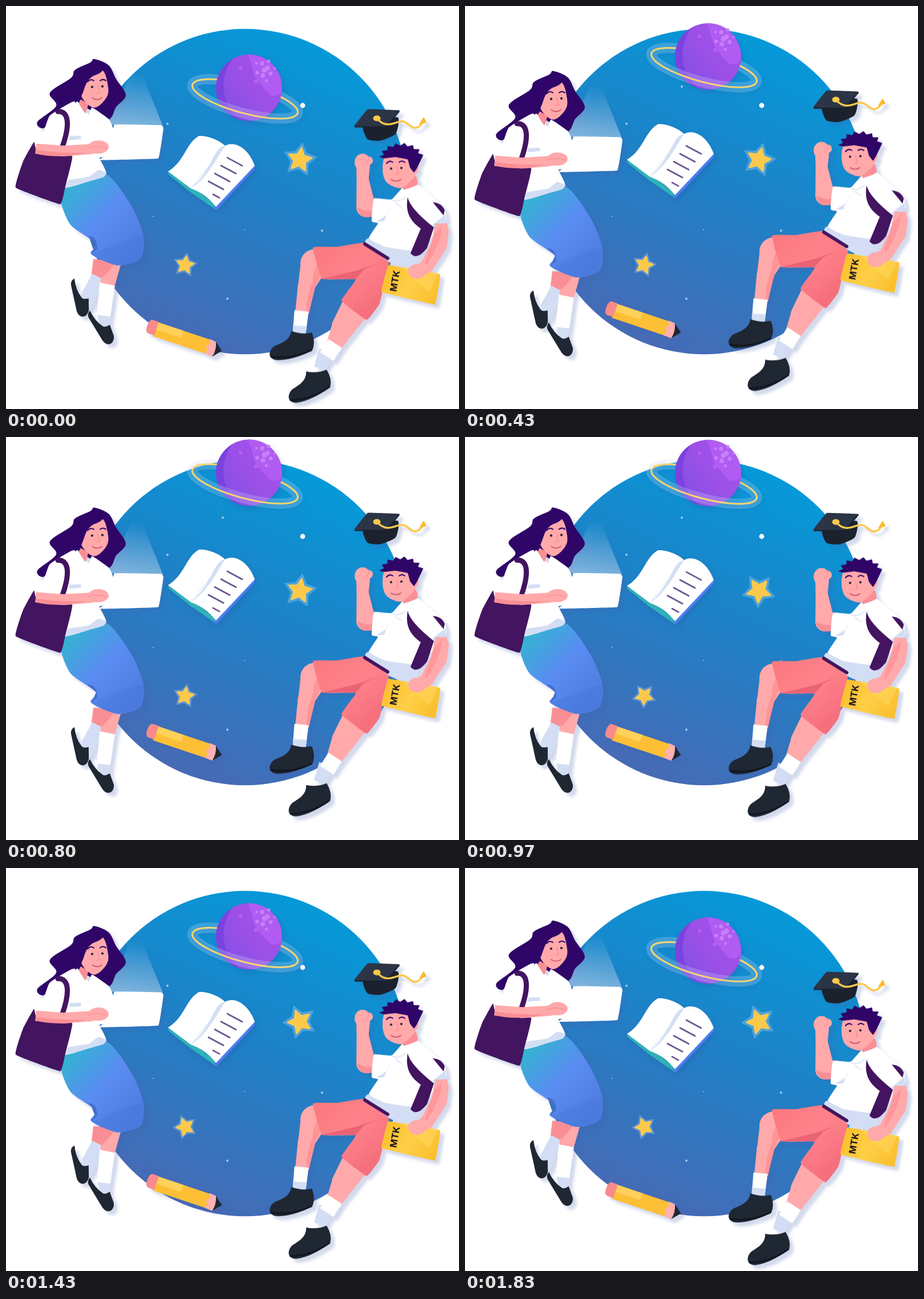
An HTML page for the animation above (1.93 s loop, 794 by 705 pixels).

```html
<!DOCTYPE html>
<html lang="en">
<head>
<meta charset="utf-8">
<title>Students in space</title>
<style>
  html, body { margin: 0; width: 100%; height: 100%; overflow: hidden; background: #fff; }
  svg { display: block; width: 794px; height: 705px; }
  .shadow { filter: drop-shadow(7px 7px 2.5px rgba(70, 95, 175, .24)); }
  .soft { filter: drop-shadow(3px 5px 4px rgba(45, 65, 150, .22)); }
  .line { fill: none; stroke-linecap: round; stroke-linejoin: round; }
</style>
</head>
<body>
<svg id="stage" viewBox="0 0 794 705"></svg>
<script>
const LOOP = 1930, FPS = 30, LAST = 55;
const HAIR = '#2f0568', PLUM = '#43145f', INK = '#1f2733', SKIN = '#ffa9ab', ROSE = '#f98f94',
      PALE = '#d3def4', GOLD = '#fdc94a', WHITE = '#fff';

// ---- drawing helpers ----

// Closed outline through key points, rounded by k (0 = straight edges)
function outline(p, k) {
  const n = p.length, at = i => p[(i + n) % n];
  return p.reduce((d, b, i) => {
    const a = at(i - 1), c = at(i + 1), e = at(i + 2);
    const near = b.map((v, j) => v + (c[j] - a[j]) * k);
    const far = c.map((v, j) => v - (e[j] - b[j]) * k);
    return d + `C${near} ${far} ${c}`;
  }, 'M' + p[0]) + 'Z';
}
const pairs = text => text.split(' ').map(s => s.split(',').map(Number));
const path = (fill, d) => `<path fill="${fill}" d="${d}"/>`;
const shape = (fill, text, k = .1) => path(fill, outline(pairs(text), k));
const line = (color, width, d) => `<path class="line" stroke="${color}" stroke-width="${width}" d="${d}"/>`;
const oval = (fill, x, y, rx, ry = rx) => `<ellipse cx="${x}" cy="${y}" rx="${rx}" ry="${ry}" fill="${fill}"/>`;
const moved = (transform, body) => `<g transform="${transform}">${body}</g>`;
const group = (id, body, cls = '') => `<g id="${id}" class="${cls}">${body}</g>`;

// Tapering limb along "x,y,radius" joints, flat at both ends
function limb(fill, text) {
  const joints = pairs(text);
  return joints.slice(1).map(([x, y, r], i) => {
    const [px, py, pr] = joints[i], len = Math.hypot(x - px, y - py);
    const nx = (py - y) / len, ny = (x - px) / len;
    const quad = [[px + nx * pr, py + ny * pr], [x + nx * r, y + ny * r], [x - nx * r, y - ny * r], [px - nx * pr, py - ny * pr]];
    return path(fill, outline(quad, 0)) + (i < joints.length - 2 ? oval(fill, x, y, r) : '');
  }).join('');
}

// Points that alternate between an outer and an inner ellipse
const zigzag = (x, y, rx, ry, inner, from, to, count) => Array.from({ length: count }, (_, i) => {
  const a = (from + (to - from) * i / (count - 1)) * Math.PI / 180, q = i % 2 ? inner : 1;
  return [x + rx * q * Math.sin(a), y - ry * q * Math.cos(a)];
});

function gradient(id, x1, y1, x2, y2, ...colors) {
  const stops = colors.map((c, i) => `<stop offset="${i / (colors.length - 1)}" stop-color="${c}"/>`).join('');
  return `<linearGradient id="${id}" gradientUnits="userSpaceOnUse" x1="${x1}" y1="${y1}" x2="${x2}" y2="${y2}">${stops}</linearGradient>`;
}

function face(x, y, gap) {
  const r = x + gap, mid = x + gap / 2;
  return oval(INK, x, y, 2.1) + oval(INK, r, y - 1, 2.1) +
    line(HAIR, 2, `M${x - 8},${y - 9}q5,-6 11,-2M${r - 4},${y - 11}q5,-4 10,0`) +
    line(ROSE, 1.6, `M${mid + 1},${y - 2}l3,12l-5,1`) +
    line('#c94f68', 1.6, `M${x},${y + 19}q9,6 17,0`);
}

const defs = `<defs>${[
  gradient('sky', 575, 70, 330, 600, '#049ad9', '#2080c6', '#476ab5'),
  gradient('beam', 235, 125, 222, 210, 'rgba(255,255,255,.03)', 'rgba(255,255,255,.42)'),
  gradient('orb', 375, 175, 470, 105, '#8350e6', '#9a50e6', '#a650ea'),
  gradient('skirt', 105, 325, 215, 435, '#35b2d3', '#5a8cf2', '#4f7de0'),
  gradient('shorts', 560, 420, 650, 520, '#fb7a80', '#ff828b', '#f56f7c'),
  gradient('pad', 670, 460, 750, 510, '#fbc02f', '#ffcf48', '#fbc02f'),
  gradient('wood', 265, 560, 360, 600, '#fbb92c', '#ffc93d', '#f8bd3c')
].join('')}</defs>`;

// ---- scenery ----

const specks = pairs('283,206,2 380,141,2 554,393,2 388,512,2 258,368,1 418,391,1');
const space = oval('url(#sky)', 419, 324.7, 284.6) + oval(WHITE, 520, 174, 4.4) +
  specks.map(([x, y, r]) => oval('#a3cbea', x, y, r)).join('');

const ring = sweep => {
  const d = `M-95.5,0A95.5,25 0 0 ${sweep} 95.5,0`;
  return moved('translate(419 161.5) rotate(15)', line('rgba(213,227,255,.23)', 18, d).replace('class="line"', 'fill="none"') + line('#fbd56f', 3, d));
};
const craters = Array.from({ length: 10 }, (_, i) => {
  const a = i * 2.4 + 3.4, q = 6 * Math.sqrt(i);
  return oval('#c77ff9', 453 + q * Math.cos(a), 111 + q * Math.sin(a) * 1.2, 4.6 - i * .28);
}).join('');
const planet = ring(1) + oval('url(#orb)', 426, 142, 58) +
  path('#7a43df', 'M397,92A58,58 0 0 0 410,198A76,76 0 0 1 397,92Z') +
  path('#b05cf2', 'M424,84A58,58 0 0 1 483,150C466,166 454,146 447,136C432,126 434,104 424,84Z') +
  craters + oval('#b562f0', 411, 107, 3) + oval('#b562f0', 438, 131, 3.5) + ring(0);

const bookLines = Array.from({ length: 5 }, (_, i) =>
  `M${388 - 11 * i + (i > 3 ? 19 : 0)},${265 + 13.8 * i + (i > 3 ? 9 : 0)}l${i > 3 ? '11,6' : '26,14'}`).join('');
const book =
  shape('#2fb2b8', '284,289 285,295 324,326 369,357 368,348 324,314', 0) +
  shape('#4c7df0', '436,278 436,285 369,357 364,351', 0) +
  path(WHITE, 'M338,227C352,226 372,233 384,244L324,319L284,289C313,272 315,240 338,227Z') +
  path(WHITE, 'M384,244C402,234 426,250 436,279L368,351Q350,328 324,319Z') +
  path(PALE, 'M384,244C362,248 364,284 324,319C349,304 364,276 384,244Z') +
  line('#6c5791', 2.8, bookLines);

// Pencil lies along its own x axis
const pencil = moved('translate(251 558) rotate(18.500)',
  path('url(#wood)', 'M12,-10H112V16H12Z').replace('url(#wood)', '#fdbf36') +
  path('#ffd05a', 'M12,-10H60V3H12Z') +
  path('#f98a8c', 'M14,-11V14H2Q-4,12 -3,0Q-2,-12 4,-11Z') +
  path('#fdb1b0', 'M108,-11L120,-10L134,2L122,17L107,16L111,9L106,3L111,-3Z') +
  path(INK, 'M120,-10L135,2L122,17Q126,4 120,-10Z'));

const cap =
  shape('#1b222d', '627,206 686,194 683,223 656,235 633,232', .1) +
  shape('#2c3546', '634,180 690,182 666,210 610,210', .015) +
  line('#1b222d', 2, 'M612,211L666,211L689,184') +
  line(GOLD, 3.4, 'M650,196C664,212 676,206 688,202C704,197 708,216 720,212Q727,210 731,201') +
  oval(GOLD, 650, 196, 6.5, 5) + shape('#f7bb2e', '732,194 737,203 724,207', .03);

// ---- people ----

const flatShoe = path(INK, 'M0,0Q2,9 12,9L56,11C72,10 72,-4 60,-10L40,-15Q40,-4 34,-3Q20,3 0,0Z');
const sneaker = path(INK, 'M0,0Q18,7 36,3Q43,20 37,34C20,42 2,50 -18,51C-42,53 -42,36 -30,27C-20,22 -2,18 0,0Z') +
  line('#10161f', 3, 'M-35,45Q2,50 35,34');

const girl =
  path('url(#beam)', 'M218,121H239L275,210L178,208Z') +
  limb(ROSE, '164,444,11 161,478,12') +
  limb(PALE, '162,474,12 146,505,13 139,528,9') +
  moved('translate(120 477) rotate(75)', flatShoe) +
  limb(PALE, '171,530,13 173,564,8') +
  limb(WHITE, '178,484,13.5 171,542,12') +
  limb(SKIN, '186,448,16 178,487,13') + shape(ROSE, '170,446 190,450 168,476') +
  moved('translate(147 533) rotate(56)', flatShoe) +
  shape('url(#skirt)', '104,318 174,294 220,350 241,402 236,442 195,454 149,434 158,416 114,384 97,345', .12) +
  path('rgba(63,111,210,.25)', 'M149,434C175,428 190,414 241,402L238,440C226,454 174,458 149,434Z') +
  path('#456fce', 'M143,403Q160,402 160,425L150,434L158,416Z') +
  // hair behind
  shape(HAIR, '155,93 180,104 193,128 210,156 193,177 178,198 128,174 88,191 66,214 55,203 88,175 77,152 114,126 121,112 148,99', .16) +
  // shirt
  shape(WHITE, '114,169 126,168 145,190 151,178 180,198 188,216 186,262 164,266 175,295 104,318 111,265 62,245 76,193', .07) +
  shape(PALE, '109,305 145,299 162,287 175,292 170,300 105,318', .06) + path(PALE, 'M111,228L131,227L132,233L111,235Z') +
  // head
  shape(ROSE, '131,164 128,171 139,188 144,172', .06) +
  shape(SKIN, '138,124 168,112 179,142 175,162 154,178 132,157', .17) +
  path(HAIR, 'M121,170Q116,120 148,105C166,98 180,108 182,126Q174,118 172,108Q170,117 154,122C132,134 142,156 121,170Z') +
  face(151, 142, 18) +
  // bag, arm and laptop
  shape(PLUM, '49,238 30,272 17,318 95,347 104,316 116,263 55,257', .04) +
  line(PLUM, 9, 'M91,185C112,184 111,212 99,246') +
  shape(WHITE, '190,208 272,209 276,214 267,267 163,270 177,260', .02) +
  limb(SKIN, '52,250,9 100,254,9.5 145,251,9 162,248,9') + oval(SKIN, 162, 247, 18, 11.5) +
  line(ROSE, 1.4, 'M143,249Q158,243 176,249') + path(ROSE, 'M52,252Q90,258 140,257Q90,268 54,259Z');

const hairTop = zigzag(693, 266, 39, 27, .82, -85, 78, 15);
const boy =
  // far leg
  limb(SKIN, '590,449,27 541,450,25 526,490,14.5 519,536,12') +
  path('#ff9496', 'M556,440Q538,452 538,481Q526,506 527,536H531L543,488L560,452Z') +
  limb(WHITE, '518,533,12.5 514,572,11.5') + limb(PALE, '515,559,12 514,573,11.5') +
  moved('translate(500 568)', sneaker) +
  // near leg
  limb(SKIN, '612,528,25 592,560,21 575,593,14') +
  limb(PALE, '562,604,14 549,634,10') + limb(WHITE, '577,590,14 562,613,14') +
  moved('translate(526 639) rotate(-10)', sneaker) +
  shape('url(#shorts)', '538,422 580,421 626,414 672,441 655,520 632,549 588,515 613,478 554,477', .04) +
  path('#ea6374', 'M554,477H613L628,460L650,450L616,462Z') +
  // raised arm
  limb(SKIN, '626,280,12 625,302,10.5 631,352,17 652,351,15') + oval(SKIN, 625, 273, 14, 15) + oval(SKIN, 637, 270, 6, 7) +
  path(ROSE, 'M616,352Q634,362 651,356V366Q618,376 616,352Z') + line(ROSE, 1.4, 'M628,277Q636,272 637,263') +
  // shirt
  shape(PALE, '636,406 726,420 714,464 672,448 630,414', .05) +
  shape(WHITE, '700,312 722,312 766,350 772,373 742,410 718,428 665,421 636,406 652,380 641,376 645,337 676,338', .06) +
  path(PALE, 'M649,377L668,365L672,352L663,376ZM748,382L771,364V379L752,397Z') +
  line('#dfe7f6', 2, 'M683,345L693,351M676,338Q686,346 700,334') +
  line(PLUM, 6, 'M629,416L669,441') +
  path(PLUM, 'M704,334Q708,354 750,387L738,423Q720,446 709,432L727,389C706,374 700,358 704,334Z') +
  path(PLUM, 'M748,343Q764,344 769,357L767,366Z') +
  // head
  shape(ROSE, '696,306 718,297 721,312 697,321', .08) +
  shape(SKIN, '668,260 660,284 667,308 693,318 716,298 723,280 711,256', .15) +
  path(HAIR, outline([...hairTop, ...pairs('720,284 715,291 708,282 704,268 682,264 664,266')], .03)) +
  face(675, 284, 18) +
  // notebook and hand
  shape('url(#pad)', '670,453 761,469 752,522 658,500', .015) + path('rgba(255,215,94,.55)', 'M690,456L758,467L742,500Z') +
  `<text transform="translate(684 500) rotate(-80)" font-family="Inter, 'Open Sans', sans-serif" font-weight="700" font-size="16" fill="#15151c">MTK</text>` +
  limb(SKIN, '763,380,10 763,394,13 759,418,14 738,454,12 724,464,11') + oval(SKIN, 720, 464, 15, 13) +
  path('#ff9699', 'M751,399L765,384Q760,420 737,452L735,446Z');

const star = (id, R) => {
  const d = (outer, inner) => outline(zigzag(0, 0, outer, outer, inner, 0, 324, 10), .02);
  return group(id, path('rgba(220,234,255,.27)', d(R * 1.4, .56)) + path(GOLD, d(R, .5)) + line('#fdcb53', 2, d(R, .5)));
};

document.getElementById('stage').innerHTML = defs + space + star('bigStar', 22) + star('smallStar', 16) +
  group('planet', planet, 'soft') + group('book', book, 'soft') + group('pencil', pencil, 'shadow') +
  group('girl', girl, 'shadow') + group('cap', cap, 'shadow') + group('boy', boy, 'shadow');

// ---- motion ----

// Travel in px between the two rest positions; "slow" parts sink more gently
const byId = id => document.getElementById(id);
const floaters = [
  ['planet', 82], ['cap', 49], ['pencil', 48], ['girl', -31.5], ['book', 31, true], ['boy', 31, true]
].map(([id, span, slow]) => ({ el: byId(id), span, slow }));
const stars = [['bigStar', 515, 269], ['smallStar', 314, 453]].map(([id, x, y]) => ({ el: byId(id), x, y }));

const ease = x => .5 - .5 * Math.cos(Math.PI * Math.min(1, Math.max(0, x)));

function level(t, slow) {
  if (t < 800) return 1 - ease((t + 70) / 810);
  return slow ? ease((t - 840) / 1000) : ease((t - 930) / 800);
}

function draw(now) {
  const step = Math.min(LAST, Math.floor((now % LOOP + 4) * FPS / 1000));
  const t = step * 1000 / FPS;
  for (const { el, span, slow } of floaters)
    el.setAttribute('transform', `translate(0 ${(span * (level(t, slow) - .97)).toFixed(2)})`);
  for (const { el, x, y } of stars)
    el.setAttribute('transform', `translate(${x} ${y}) rotate(${(9 + t * .18).toFixed(2)})`);
}

const start = performance.now();
function tick() {
  draw(performance.now() - start);
  requestAnimationFrame(tick);
}
tick();
</script>
</body>
</html>
```
